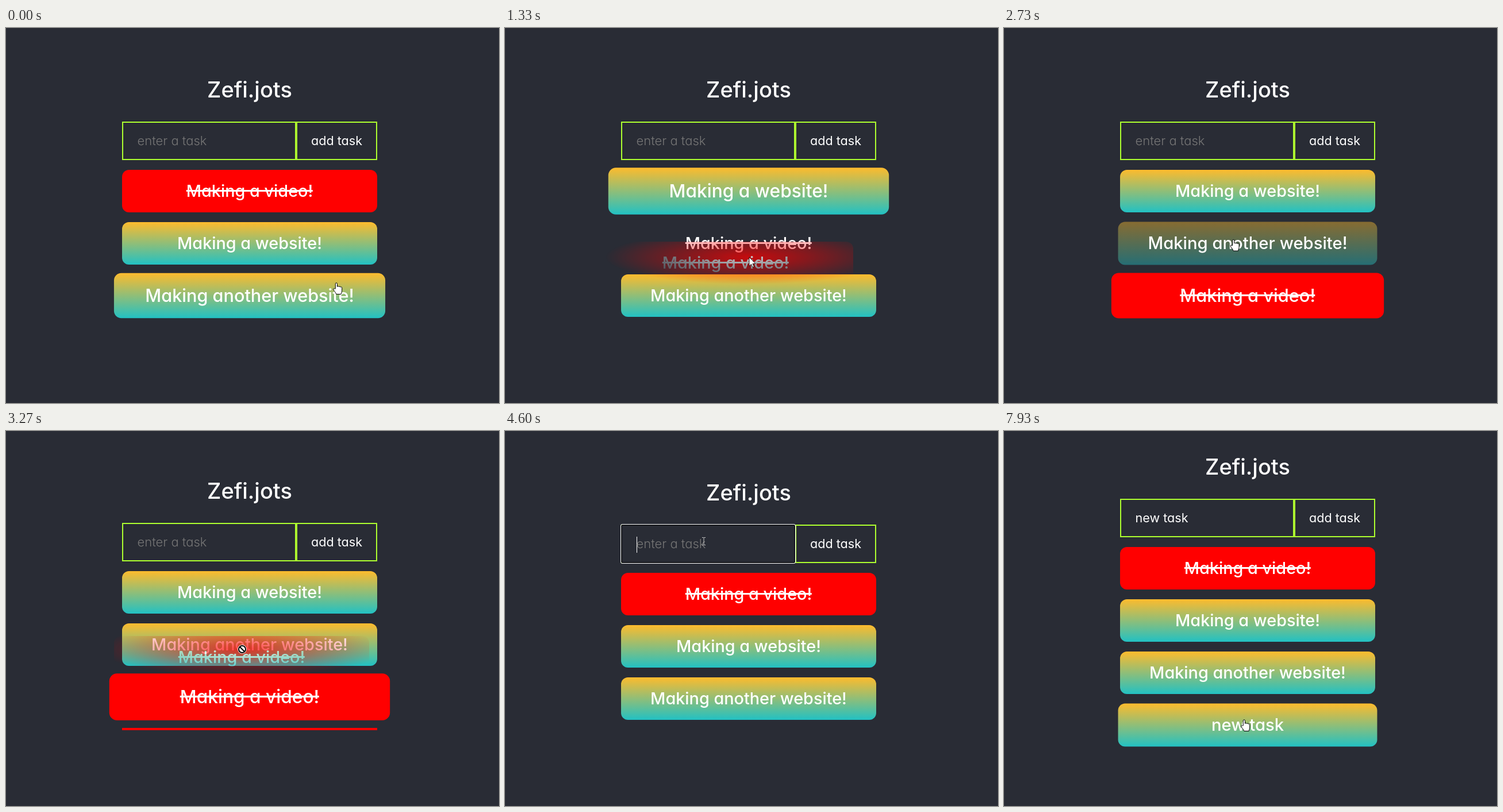
Write an HTML page that moves like this. It is 858x653 px and loops after 8 s.

```html
<!DOCTYPE html>
<html lang="en">
<head>
<meta charset="utf-8">
<title>Task list</title>
<style>
html, body { margin: 0; width: 100%; height: 100%; overflow: hidden; background: #292c35; }
body { position: relative; color: #fff; font-family: Inter, "Open Sans", sans-serif; font-feature-settings: "cv11"; }
#page { position: absolute; left: 0; width: 858px; }
#page > *, .row, .row *, #cursor { position: absolute; box-sizing: border-box; }
h1 { left: 202px; top: 77px; width: 444px; margin: 0; text-align: center; font-size: 38px; font-weight: 500; line-height: 60px; }
.box { top: 163px; height: 67px; border: 2px solid #adff2f; font-size: 21.6px; line-height: 63px; white-space: pre; }
#field { left: 202px; width: 303px; padding-left: 24.5px; }
#add { left: 505px; width: 141px; text-align: center; }
#hint { color: #757575; font-size: 22px; font-weight: 300; }
#caret { display: inline-block; width: 1px; height: 28px; margin-right: -1px; vertical-align: middle; background: #fff; }
#ring { left: 201px; top: 162px; width: 305px; height: 69px; border: 1.5px solid #fff; border-radius: 3px; box-shadow: inset 0 0 0 2px #15161a; }
#line { left: 202px; width: 444px; height: 4px; background: #f00; }
.row { left: 202px; width: 444px; height: 74px; }
.row i { inset: 0; border-radius: 12px; background: linear-gradient(0deg, #22c1c3, #fdbb2d); }
.row b { left: 50%; top: 0; transform: translateX(-50%); font-size: 28.8px; font-weight: 500; line-height: 74px; white-space: pre; }
.done i { background: #f00; }
.done b::after { content: ""; position: absolute; left: 0; right: 0; top: 35px; height: 2.5px; background: #fff; }
#cursor { left: 0; top: 0; width: 1px; height: 1px; overflow: visible; }
</style>
</head>
<body>
<div id="page">
  <h1>Zefi.jots</h1>
  <div id="field" class="box"><span id="typed"></span><span id="caret"></span><span id="hint">enter a task</span></div>
  <div id="add" class="box">add task</div>
  <div id="ring"></div>
  <div id="line"></div>
</div>
<svg id="cursor">
  <g id="hand"><path fill="#fff" stroke="#000" d="M-1.7 10V1.5a1.6 1.6 0 0 1 3.2 0V6.5a1.6 1.6 0 0 1 3 .3a1.5 1.5 0 0 1 2.8 .5a1.4 1.4 0 0 1 2.4 1V13c0 3-1.5 4-1.5 6.5H-.3c-.6-3-4-5.5-5-8.5c-.3-1.6 1.8-2 2.6-.5z"/></g>
  <g id="arrow"><path fill="#fff" stroke="#000" stroke-width=".8" d="M0 0V15.5L3.6 12.2L6 17.6L8.4 16.5L6 11.4H10.8z"/></g>
  <g id="no"><circle r="7.8" fill="#fff"/><path fill="none" stroke="#000" stroke-width="2" d="M-6 0a6 6 0 1 0 12 0a6 6 0 1 0-12 0M-4.2-4.2L4.2 4.2"/></g>
  <g id="beam"><path fill="none" stroke="#c8c8c8" d="M-3-6.5H-.5M.5-6.5H3M-3 6.5H-.5M.5 6.5H3M0-6.5V6.5"/></g>
</svg>
<script>
const $ = id => document.getElementById(id);
const show = (el, on) => el.style.display = on ? "" : "none";
const clamp = (v, max = 1) => Math.max(0, Math.min(max, v));
const ease = u => u * u * (3 - 2 * u);

const LOOP = 8000, STEPS = 120, FADE = 450;
const TOP = 247, PITCH = 91, HEIGHT = 74, LEFT = 202, WIDTH = 444;
const FOCUS = 4570, CLICK = 7000;
const words = [{ start: 5330, end: 5530, gap: 66 }, { start: 6000, end: 6270, gap: 90 }];
const labels = { v: "Making a video!", w: "Making a website!", a: "Making another website!", n: "new task" };

// Pointer moves: start, end, x, y
const moves = [
  [0, 470, 465, 274], [530, 1330, 425, 399], [1470, 1800, 412, 472], [1930, 2200, 384, 361],
  [2330, 2500, 386, 325], [2600, 2930, 425, 452], [3070, 3270, 411, 380], [3270, 3670, 409, 231],
  [3930, 4400, 346, 192], [6800, CLICK, 575, 195], [7600, 7930, 418, 503]
];

function pointerAt(t) {
  let x = 575, y = 444;
  for (const [start, end, toX, toY] of moves) {
    const u = ease(clamp((t - start) / (end - start)));
    x += (toX - x) * u;
    y += (toY - y) * u;
  }
  return { x, y };
}

const slotAt = y => Math.ceil((y - TOP) / PITCH);
const timeOf = step => Math.round(step * 20 / 3) * 10;

// Each drag picks up the row under the pointer and drops it at the pointer's slot
const states = [{ at: 0, list: ["v", "w", "a"] }];
const drags = [[530, 1330], [1930, 2530], [3070, 3920]].map(([start, drop]) => {
  const grab = pointerAt(start), from = slotAt(grab.y) - 1, slot = slotAt(pointerAt(drop).y);
  const list = [...states[states.length - 1].list];
  const [key] = list.splice(from, 1);
  list.splice(slot > from ? slot - 1 : slot, 0, key);
  states.push({ at: drop, list, key });
  return { start, drop, key, gripX: grab.x - LEFT, gripY: grab.y - TOP - PITCH * from };
});
states.push({ at: CLICK, list: [...states[states.length - 1].list, "n"], key: "n" });

const dragAt = t => drags.find(d => t >= d.start && t <= d.drop);
const listAt = t => states.filter(s => s.at <= t).pop().list;

function hoveredSlot(t) {
  const { x, y } = pointerAt(t), count = listAt(t).length;
  const depth = y - TOP + (count > 3 ? 45 : 0), slot = Math.floor(depth / PITCH);
  const inside = x > LEFT && x < LEFT + WIDTH && depth - slot * PITCH < HEIGHT;
  return inside && slot < count ? slot : -1;
}

// Hover growth of every slot at every step; hovering is frozen while dragging
const growth = [[0, 0, 0.59, 0]];
for (let n = 1, slot; n < STEPS; n++) {
  const t = timeOf(n);
  if (!dragAt(t)) slot = hoveredSlot(t);
  growth.push(growth[n - 1].map((g, i) => clamp(g + (i === slot ? 0.125 : -0.125))));
}

function makeRow(key, parent) {
  const row = document.createElement("div");
  row.className = key === "v" ? "row done" : "row";
  row.innerHTML = `<i></i><b>${labels[key]}</b>`;
  parent.append(row);
  return row;
}

const rows = {};
for (const key in labels) rows[key] = makeRow(key, $("page"));

for (const drag of drags) {
  const mask = `radial-gradient(ellipse 250px 47px at ${drag.gripX}px ${drag.gripY}px, rgba(0,0,0,.74), transparent)`;
  drag.ghost = makeRow(drag.key, document.body);
  drag.ghost.style.webkitMaskImage = drag.ghost.style.maskImage = mask;
}
document.body.append($("cursor"));

function drawList(t, step) {
  const list = listAt(t), count = list.length, drag = dragAt(t), delay = 130;
  const open = drag && t < drag.drop && t - delay >= drag.start;
  const slot = open ? slotAt(pointerAt(t - delay).y) : count;
  const dy = count > 3 ? -45 : !open ? 0 : slot === count ? -3 : -10;
  $("page").style.top = dy + "px";
  show($("line"), open);
  $("line").style.top = TOP + PITCH * slot + "px";
  for (const key in rows) {
    const i = list.indexOf(key), row = rows[key];
    show(row, i >= 0);
    if (i < 0) continue;
    row.style.top = TOP + PITCH * i + (i >= slot ? 20 : 0) + "px";
    row.style.transform = `scale(${1 + 0.1 * ease(growth[step][i])})`;
    const placed = states.filter(s => s.key === key && s.at <= t).pop();
    row.firstChild.style.opacity = placed ? clamp((t - placed.at) / FADE) : 1;
  }
}

function drawField(t) {
  const counts = words.map(w => clamp(Math.floor((t - w.start) / w.gap) + 1, 4));
  const typed = counts[0] + counts[1];
  const focused = t >= FOCUS && t < CLICK;
  const wake = counts[1] ? words[1].end : typed ? words[0].end : FOCUS;
  $("typed").textContent = labels.n.slice(0, typed);
  show($("hint"), !typed);
  show($("ring"), focused);
  show($("caret"), focused && (t - wake) % 1000 < 500);
}

function drawPointer(t) {
  const { x, y } = pointerAt(t), drag = dragAt(t);
  const kind = drag ? (t < drag.drop ? "no" : "arrow") : y < 230 && x < 505 ? "beam" : "hand";
  for (const g of $("cursor").children) show(g, g.id === kind);
  $("cursor").style.transform = `translate(${x}px, ${y}px)`;
  for (const d of drags) {
    show(d.ghost, d === drag);
    d.ghost.style.left = x - d.gripX + "px";
    d.ghost.style.top = y - d.gripY + "px";
  }
}

const origin = performance.now();
function frame() {
  // Fifteen steps a second, as in a screen recording
  const step = Math.floor(((performance.now() - origin) % LOOP + 4) * STEPS / LOOP) % STEPS;
  const t = timeOf(step);
  drawList(t, step);
  drawField(t);
  drawPointer(t);
  requestAnimationFrame(frame);
}
frame();
</script>
</body>
</html>
```
